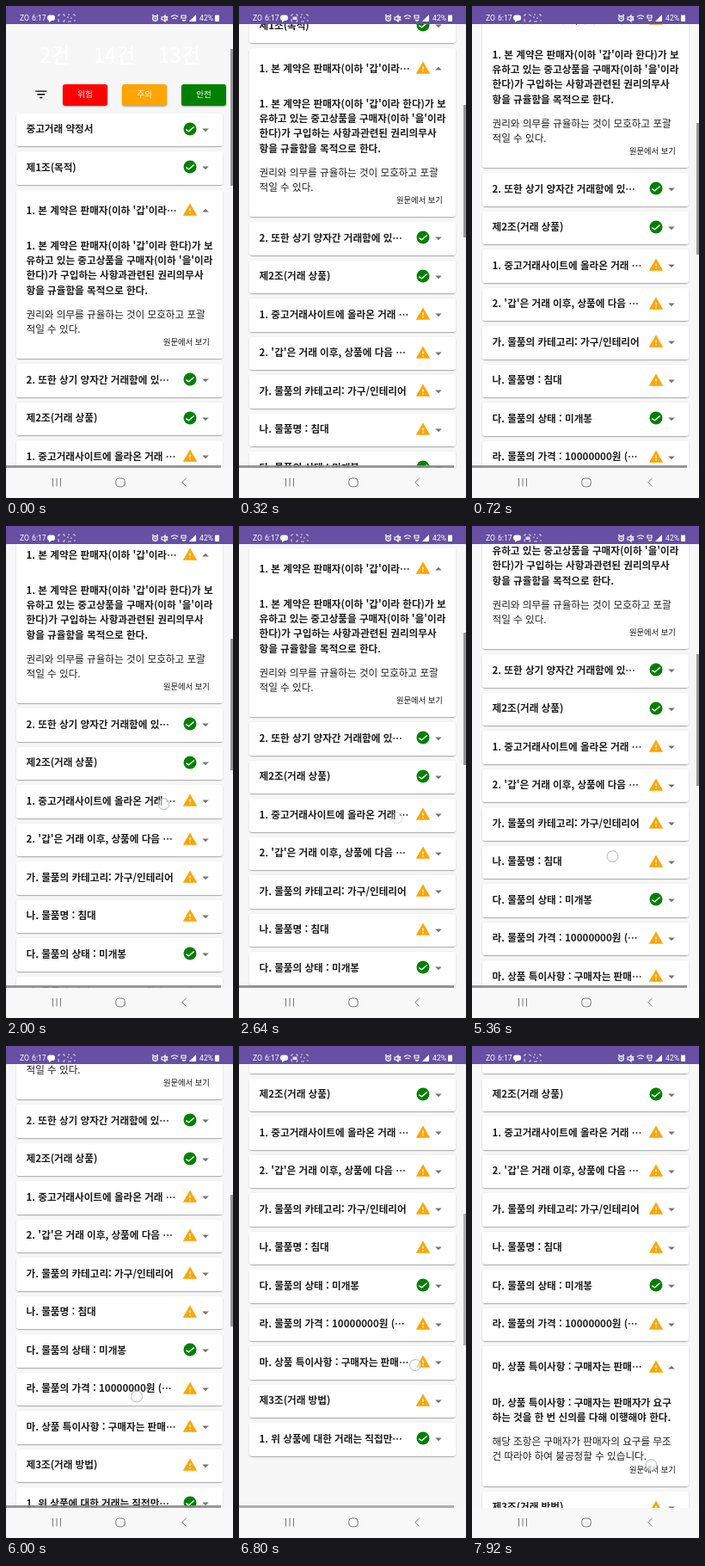
Write an HTML page that moves like this. It is 264 px wide and 572 px high and loops after 8000 ms.

```html
<!DOCTYPE html>
<html lang="ko">
<head>
<meta charset="utf-8">
<style>
html, body { margin: 0; width: 264px; height: 572px; overflow: hidden; background: #f7f7f7; }
body { position: relative; font: 11.6px/17.1px "Noto Sans CJK KR", "Noto Sans CJK", sans-serif; color: #1d1d1d; white-space: nowrap; }
div, svg { position: absolute; }
b, p { display: block; margin: 0; }
#view { top: 21px; width: 264px; height: 516px; overflow: hidden; }
#page { top: -21px; width: 264px; }
.shade, .card { left: 11.7px; width: 240.3px; border-radius: 3px; }
.shade { box-shadow: 0 1.5px .8px -.7px #0003, 0 .8px .8px #0002, 0 .8px 2.2px #0002; }
.card { background: #fff; overflow: hidden; }
.card svg { width: 18px; height: 18px; }
.summary { width: 240px; height: 37px; }
.summary b { margin: 9.5px 11.8px; }
.mark { left: 193.3px; top: 9px; }
.arrow { left: 211px; top: 10.3px; }
.detail { left: 11.8px; top: 56.8px; padding-bottom: 10.4px; }
.detail p { margin-top: 11px; }
.detail p.link { margin: -1.4px 0 0 159.5px; font-size: 9.3px; color: #111; }
.count { top: 39px; font-size: 24px; line-height: 34px; color: #fff; }
.filter { top: 91px; width: 52px; height: 24.5px; border-radius: 3px; color: #fff; font-size: 9.5px; line-height: 23.5px; text-align: center; box-shadow: 0 1px 2px #0005; }
.bar { background: #8c8c8c; }
#touch { width: 12px; height: 12px; margin: -7px; border: 1px solid #aeb9c6; border-radius: 50%; background: #f4f8fc99; }
</style>
</head>
<body>
<div id="view"><div id="page">
  <div class="count" style="left:39px">2건</div>
  <div class="count" style="left:101.5px">14건</div>
  <div class="count" style="left:177px">13건</div>
  <svg style="left:31.6px;top:93.5px" width="17.6" height="17.6" viewBox="0 0 24 24" stroke="#000" stroke-width="2"><path d="M3 7h18M6 12h12M10 17h4"/></svg>
  <div class="filter" style="left:66px;background:red">위험</div>
  <div class="filter" style="left:135px;background:orange">주의</div>
  <div class="filter" style="left:204px;background:green">안전</div>
</div></div>
<div class="bar" style="top:534px;width:250px;height:3px"></div>
<div class="bar" id="thumb" style="left:261px;width:3px"></div>
<svg width="264" height="572" fill="none" stroke="#fff" font-family="Roboto, sans-serif" font-size="8.7">
  <path d="M0 0h264v21H0z" fill="#674fa3" stroke="none"/>
  <g fill="#fff" stroke="none">
    <text x="16" y="17">ZO</text><text x="30" y="17">6:17</text><text x="225" y="17">42%</text>
    <rect x="48" y="10.5" width="9" height="6.5" rx="3"/><path d="M50 16v3l3-2z"/>
    <path d="M213 18h8v-8z"/><rect x="243" y="10.5" width="5" height="7.5" rx="1"/>
    <rect id="blink" x="62.5" y="12.5" width="5" height="3.5" opacity=".8"/>
  </g>
  <g opacity=".75">
    <rect x="61" y="10" width="7" height="8" stroke-dasharray="2 3 4 4 4 4 4 3 2"/>
    <rect x="72" y="10" width="8" height="8" stroke-dasharray="2 4 4 4"/><path d="M75 14h2"/>
  </g>
  <g stroke-width="1.2">
    <circle cx="173.5" cy="14.5" r="2.8"/><path d="M170 11.5l1.5-1.5m4 0 1.5 1.5M173.5 13v2h1"/>
    <path d="M181 13v3h2l2 2v-7l-2 2zm5-1 2 5m0-5-2 5"/>
    <path d="M192 12.5q4-3.5 8 0M193.7 15q2.3-2 4.6 0"/><path d="M204 11h5v3h-5zm1 5q2 2 4 0"/>
  </g>
  <path d="M0 537h264v35H0z" fill="#f8f8f8" stroke="none"/>
  <g stroke="#777"><path d="M54.5 549v9.5m4.5-9.5v9.5m4.5-9.5v9.5M209.7 549l-5 4.7 5 4.8"/><rect x="127.7" y="549" width="10.6" height="9.8" rx="3.8"/></g>
</svg>
<div id="touch"></div>
<script>
const OK = '<circle cx="12" cy="12" r="10" fill="green"/><path d="M5.7 12.7l4.3 3 8.3-7" fill="none" stroke="#fff" stroke-width="2"/>';
const WARN = '<path d="M1 21h22L12 2z" fill="orange"/><path d="M12 10v4m0 2v2" stroke="#fff" stroke-width="2"/>';
const ARROW = '<path d="M7 10l5 5 5-5z" fill="#757575"/>';
const CLOSED = 38.5, GAP = 6, FIRST = 124.5, PERIOD = 8000, STEP = 80;
const CLAUSES = [
  [OK, '중고거래 약정서'],
  [OK, '제1조(목적)'],
  [WARN, "1. 본 계약은 판매자(이하 '갑'이라⋯",
    "1. 본 계약은 판매자(이하 '갑'이라 한다)가 보<br>유하고 있는 중고상품을 구매자(이하 '을'이라<br>한다)가 구입하는 사항과관련된 권리의무사<br>항을 규율함을 목적으로 한다.",
    '권리와 의무를 규율하는 것이 모호하고 포괄<br>적일 수 있다.', () => 1],
  [OK, '2. 또한 상기 양자간 거래함에 있⋯'],
  [OK, '제2조(거래 상품)'],
  [WARN, '1. 중고거래사이트에 올라온 거래 ⋯'],
  [WARN, "2. '갑'은 거래 이후, 상품에 다음 ⋯"],
  [WARN, '가. 물품의 카테고리: 가구/인테리어'],
  [WARN, '나. 물품명 : 침대'],
  [OK, '다. 물품의 상태 : 미개봉'],
  [WARN, '라. 물품의 가격 : 10000000원 (⋯'],
  [WARN, '마. 상품 특이사항 : 구매자는 판매⋯',
    '마. 상품 특이사항 : 구매자는 판매자가 요구<br>하는 것을 한 번 신의를 다해 이행해야 한다.',
    '해당 조항은 구매자가 판매자의 요구를 무조<br>건 따라야 하여 불공정할 수 있습니다.',
    t => smooth((t - 6960) / 400)],
  [WARN, '제3조(거래 방법)'],
  [OK, '1. 위 상품에 대한 거래는 직접만⋯']
];
// A gesture scrolls by some distance, easing out; with a hold time the finger shows.
const GESTURES = [
  { at: 0, ms: 740, by: 222, power: 2.4 },
  { at: 1700, ms: 780, by: -34, hold: 1020, x: 183.5, y: 305.5 },
  { at: 4900, ms: 780, by: 107, hold: 620, x: 163.5, y: 463 },
  { at: 5785, ms: 715, by: 127.5, hold: 400, x: 152, y: 460.5 },
  { at: 6880, hold: 160, x: 205, y: 371 },
  { at: 7900, hold: 180, x: 208.5, y: 487 }
];

const $ = id => document.getElementById(id);
const clamp = p => Math.min(1, Math.max(0, p));
const smooth = p => (p = clamp(p), p * p * (3 - 2 * p));
const icon = (name, shape) => `<svg class="${name}" viewBox="0 0 24 24">${shape}</svg>`;
const moved = (g, t) => g.by ? g.by * (1 - (1 - clamp((t - g.at) / g.ms)) ** (g.power || 1.5)) : 0;

function add(className, html = '') {
  const el = document.createElement('div');
  el.className = className;
  el.innerHTML = html;
  return $('page').appendChild(el);
}

const cards = CLAUSES.map(([mark, title, clause, note, openness = () => 0]) => {
  const shade = add('shade');
  const el = add('card', `<div class="summary"><b>${title}</b>${icon('mark', mark)}${icon('arrow', ARROW)}</div>` +
    (clause ? `<div class="detail"><b>${clause}</b><p>${note}</p><p class="link">원문에서 보기</p></div>` : ''));
  const detail = el.querySelector('.detail');
  const growth = detail ? detail.offsetTop + detail.getBoundingClientRect().height - CLOSED : 0;
  return { boxes: [shade, el], detail, growth, openness, summary: el.firstChild, arrow: el.querySelector('.arrow') };
});

function drawCards(t) {
  let top = FIRST;
  for (const { boxes, detail, growth, openness, summary, arrow } of cards) {
    const open = openness(t), height = CLOSED + growth * open;
    for (const box of boxes) Object.assign(box.style, { top: top + 'px', height: height + 'px' });
    summary.style.top = 5.5 * open + 'px';
    arrow.style.transform = `rotate(${180 * open}deg)`;
    if (detail) detail.style.visibility = open ? 'visible' : 'hidden';
    top += height + GAP;
  }
}

function drawScroll(t) {
  const scroll = Math.round(GESTURES.reduce((sum, g) => sum + moved(g, t), 0));
  $('page').style.transform = `translateY(${-scroll}px)`;
  const lead = 1 - clamp(scroll / 204);
  $('thumb').style.top = 71 + scroll * .293 - 21 * lead + 'px';
  $('thumb').style.height = 153 + 6 * lead + 'px';
  // Bars stay for a moment after the movement, then fade.
  const shown = Math.max(...GESTURES.map(g => g.by && t >= g.at ? clamp((g.at + g.ms + 480 - t) / 240) : 0));
  document.querySelectorAll('.bar').forEach(bar => bar.style.opacity = shown * .9);
}

function drawTouch(t) {
  const g = GESTURES.find(g => g.hold && t >= g.at - 100 && t < g.at + g.hold);
  $('touch').style.display = g ? '' : 'none';
  if (!g) return;
  $('touch').style.transform = `translate(${g.x}px, ${g.y - moved(g, t)}px)`;
  $('touch').style.opacity = clamp((g.at + g.hold - t) / 160);
}

function loop() {
  const t = Math.floor(performance.now() % PERIOD / STEP) * STEP;
  drawCards(t);
  drawScroll(t);
  drawTouch(t);
  $('blink').style.display = (t + 1300) % 1320 < 640 ? '' : 'none';
  requestAnimationFrame(loop);
}
loop();
</script>
</body>
</html>
```
